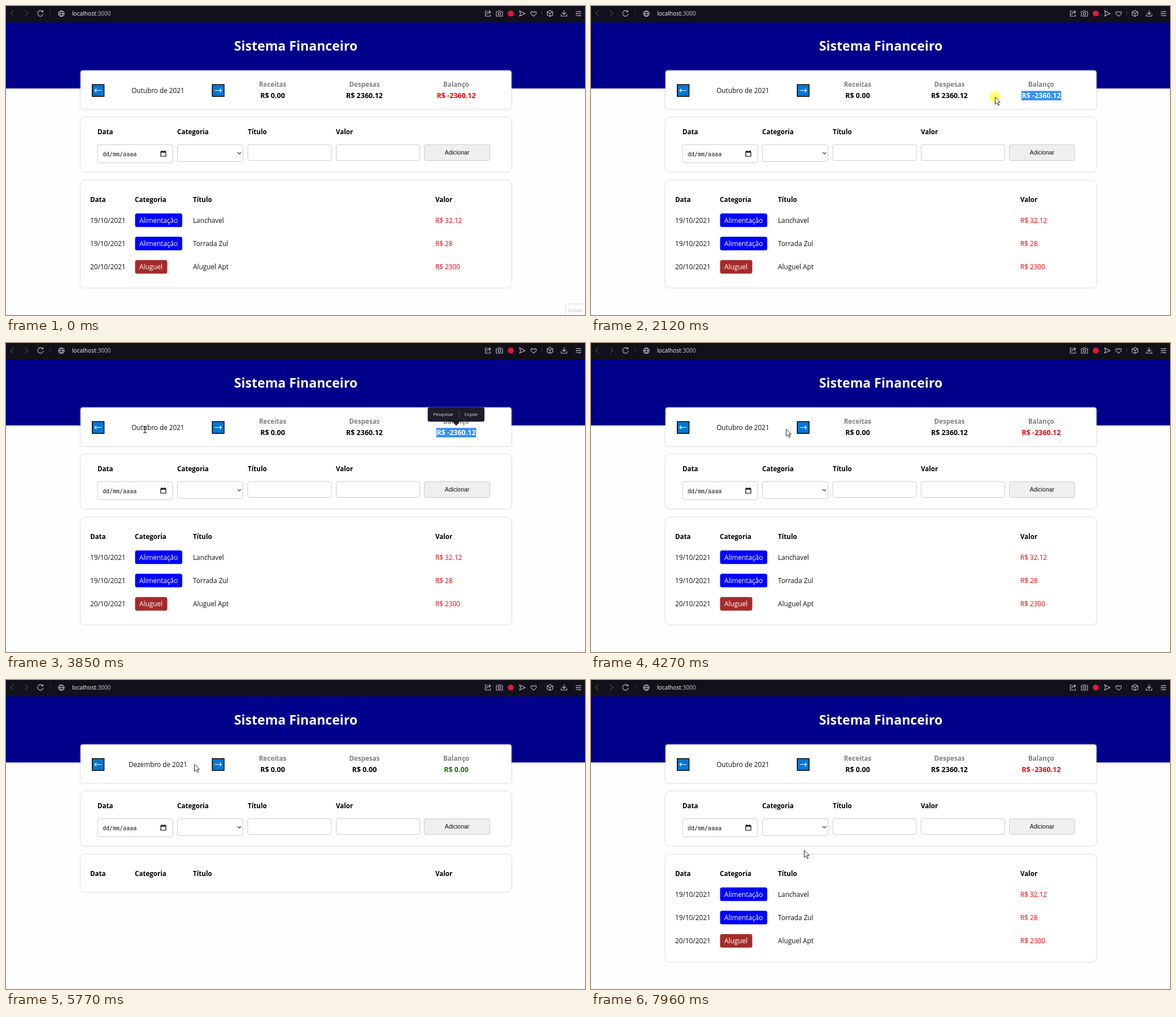
An HTML page for the animation above (8000 ms loop, 1025x547 px).

```html
<!DOCTYPE html>
<html lang="pt-BR">
<head>
<meta charset="utf-8">
<title>Sistema Financeiro</title>
<style>
  html, body { margin: 0; width: 100%; height: 100%; overflow: hidden; background: #fefefe; }
  svg { display: block; width: 100vw; height: 100vh; }
  text { font: 11.8px "Open Sans", "Noto Sans", sans-serif; fill: #111; white-space: pre; }
  .bold { font-weight: 700; font-size: 11.6px; fill: #000; }
  .gray { fill: #808080; }
  .sum { font-weight: 700; font-size: 12.5px; fill: #000; }
  .mid { text-anchor: middle; }
  .title { font-weight: 700; font-size: 23.1px; fill: #fff; }
  .url { font-size: 10.2px; fill: #fff; }
  .mono { font: 10px "DejaVu Sans Mono", monospace; }
  .button { font: 10.4px "Liberation Sans", sans-serif; }
  .popup { font-size: 7.9px; fill: #e4e3e8; }
  .white { fill: #fff; }
  .red { fill: #f00; }
  .green { fill: #008000; }
  .card { fill: #fff; filter: url(#shadow); }
  .field { fill: #fff; stroke: #ccc; }
  .icons { fill: none; stroke: #bdbbc8; stroke-width: 1.1; stroke-linejoin: round; stroke-linecap: round; }
  .dim { stroke: #4a4756; }
</style>
</head>
<body>
<svg id="stage" viewBox="0 0 1025 547">
  <defs>
    <filter id="shadow" x="-5%" y="-20%" width="110%" height="140%">
      <feDropShadow dx="0" dy="0" stdDeviation="1.8" flood-color="#bbb"/>
    </filter>
  </defs>
</svg>
<script>
const LOOP = 8000;
const stage = document.getElementById('stage');

const text = (x, y, content, cls = '') => `<text x="${x}" y="${y}" class="${cls}">${content}</text>`;
const rect = (x, y, w, h, attrs = '') => `<rect x="${x}" y="${y}" width="${w}" height="${h}" ${attrs}/>`;
const path = (d, attrs = '') => `<path d="${d}" ${attrs}/>`;
const circle = (x, y, r, attrs = '') => `<circle cx="${x}" cy="${y}" r="${r}" ${attrs}/>`;
const group = (content, attrs = '') => {
  const g = document.createElementNS(stage.namespaceURI, 'g');
  g.innerHTML = content;
  if (attrs) g.setAttribute('class', attrs);
  return stage.appendChild(g);
};

// Browser bar
group(rect(0, 0, 1025, 146, 'fill="#00008b"') + rect(0, 0, 1025, 29, 'fill="#12101a"') +
  text(117, 17, 'localhost<tspan fill="#c4c2cc">:3000</tspan>', 'url') +
  text(513, 79, 'Sistema Financeiro', 'title mid'));
group(
  path('M13 8.5L8 13L13 17.5M34 8.5L39 13L34 17.5', 'class="dim"') +
  path('M78.500 9V18M948.500 9V18', 'class="dim" stroke-dasharray="1 2"') +
  path('M65 10A5 5 0 1 0 66 14M65.500 8V10.500H63') +
  circle(98, 13.5, 5) + path('M93 13.500H103M98 8.500C94.500 11 94.500 16 98 18.500C101.500 16 101.500 11 98 8.500') +
  path('M852 9H848.500V18H857.500V15M851 15C851 12 853 10.500 857.500 10.500M855 8L858 10.500L855 13') +
  path('M868 10H871L872 8.500H875L876 10H879V18H868Z') + circle(873.5, 13.8, 2.2) +
  path('M909 8.500L919 13.500L909 18L911 13.500Z') +
  path('M934 18C926 13 929 8 934 11C939 8 942 13 934 18Z') +
  path('M963 8L968 10.500V16L963 18.500L958 16V10.500ZM958 10.500L963 13L968 10.500M963 13V18') +
  path('M988 8V15M985 12L988 15L991 12M983 15V18H993V15') +
  path('M1009 10H1018M1009 13.500H1018M1009 17H1018M1015 9V11M1011 12.500V14.500M1015 16V18'), 'icons');
group(circle(893.5, 13.3, 5.3, 'fill="#e5173f"'));

// Summary and form cards
const monthButton = (x, head) =>
  rect(x + .7, 139.2, 20.8, 20.8, 'fill="#0078d7" stroke="#000" stroke-width="1.5"') +
  path(`M${x + 5} 149.500H${x + 17}${head}`, 'fill="none" stroke="#fff" stroke-width="1.1"');
group(
  rect(132, 114.3, 762.6, 68, 'rx="4" class="card"') +
  rect(132, 197.3, 762.6, 96, 'rx="8" class="card"') +
  monthButton(152, 'M160 146.500L157 149.500L160 152.500') +
  monthButton(364.500, 'M378.500 146.500L381.500 149.500L378.500 152.500') +
  text(472, 143, 'Receitas', 'bold gray mid') +
  text(634.5, 143, 'Despesas', 'bold gray mid') +
  text(797, 143, 'Balanço', 'bold gray mid') +
  [[162, 'Data'], [303, 'Categoria'], [428, 'Título'], [584, 'Valor']]
    .map(([x, label]) => text(x, 226.5, label, 'bold')).join('') +
  [[162, 133, 32], [303.5, 116, 30], [428, 148, 28], [584.5, 148, 28]]
    .map(([x, w, h]) => rect(x, 245.5, w, h, 'rx="3.5" class="field"')).join('') +
  text(171, 265.5, 'dd/mm/aaaa', 'mono') +
  path('M274 258H283V266H274Z', 'fill="none" stroke="#000" stroke-width="1.2"') +
  path('M274 258.500H283M276 256V258M281 256V258', 'stroke="#000" stroke-width="2"') +
  path('M410 259L413 262L416 259', 'fill="none" stroke="#333" stroke-width="1.2"') +
  rect(740.5, 245.5, 116, 28, 'rx="3.5" fill="#efefef" stroke="#ccc"') +
  text(798.5, 263, 'Adicionar', 'button mid'));

// Months
const badges = {
  'Alimentação': ['#00f', 83.5], 'Aluguel': ['#a52a2a', 57], 'Salário': ['#008000', 52.5]
};
const row = ([date, category, title, value], i) => {
  const y = 384 + i * 41.2;
  const [color, width] = badges[category];
  return text(149, y, date) + rect(228.5, y - 16.7, width, 24, `rx="3.5" fill="${color}"`) +
    text(236, y, category, 'white') + text(331, y, title) +
    text(760, y, `R$ ${value}`, category === 'Salário' ? 'green' : 'red');
};
const month = (name, income, expense, balance, rows) => group(
  text(269, 153.5, `${name} de 2021`, 'mid') +
  text(472, 163.3, `R$ ${income}`, 'sum mid') +
  text(634.5, 163.3, `R$ ${expense}`, 'sum mid') +
  text(797, 163.3, `R$ ${balance}`, `sum mid ${balance[0] === '-' ? 'red' : 'green'}`) +
  rect(132, 309, 762.6, 66 + rows.length * 41.2, 'rx="8" class="card"') +
  [[149, 'Data'], [228, 'Categoria'], [331, 'Título'], [760, 'Valor']]
    .map(([x, label]) => text(x, 347, label, 'bold')).join('') +
  rows.map(row).join(''));
const months = [
  month('Outubro', '0.00', '2360.12', '-2360.12', [
    ['19/10/2021', 'Alimentação', 'Lanchavel', '32.12'],
    ['19/10/2021', 'Alimentação', 'Torrada Zul', '28'],
    ['20/10/2021', 'Aluguel', 'Aluguel Apt', '2300']]),
  month('Novembro', '4500.00', '0.00', '4500.00', [
    ['18/11/2021', 'Salário', 'Sálario VUNQ', '4500']]),
  month('Dezembro', '0.00', '0.00', '0.00', [])
];

// Overlays
const selection = group(rect(762, 150.3, 70.3, 16.7, 'fill="#3390ff"') +
  text(797, 163.3, 'R$ -2360.12', 'sum mid white'));
const popup = group(
  rect(746.5, 113.7, 100.5, 25.5, 'rx="3.5" fill="#1f1c2b"') +
  path('M790.500 139H803.500L797 146.500Z', 'fill="#1f1c2b"') +
  path('M802.500 120V133', 'stroke="#45425a"') +
  text(756, 129, 'Pesquisar', 'popup') + text(811.5, 129, 'Copiar', 'popup'));
const recordTip = group(rect(990.5, 527.5, 40, 25, 'fill="#fff" stroke="#ddd"') +
  `<text x="995" y="542" style="font-size:8.3px;fill:#bbb">Gravar</text>`);

const press = group(circle(0, 0, 9.3, 'fill="#ff0" fill-opacity=".6"'));
const cursors = {
  arrow: group(path('M.5 .5V13L3.500 10.300L5.700 15L7.600 14.100L5.500 9.500H9.300Z',
    'fill="#fff" stroke="#111" stroke-width=".9"')),
  beam: group(path('M-3 -5.500H-1L0 -4.500L1 -5.500H3M0 -4.500V5M-3 6H-1L0 5L1 6H3',
    'fill="none" stroke="#111" stroke-width="1.1"')),
  hand: group(path('M-1 1C-1 -.800 1.500 -.800 1.500 1V6C2 4.800 4 5 4 6.300C4.800 5.400 6.500 5.800 6.500 7C7.500 6.300 9 7 9 8.300V12L7.500 15V17H0V15L-4 10C-5 8.500 -3.300 7.500 -2.300 8.700L-1 10Z',
    'fill="#fff" stroke="#111" stroke-width="1"'))
};

// Pointer path: time, x, y
const route = [
  [70, 1000, 538], [290, 660, 440], [500, 272, 335], [570, 278, 300], [820, 600, 216],
  [1030, 745, 190], [1380, 815, 176], [1670, 834, 163], [1790, 834, 163], [2200, 660, 160],
  [2510, 583, 163], [2790, 486, 167], [3080, 350, 160], [3360, 236, 154], [3570, 219, 152],
  [3850, 246, 153], [4060, 312, 153], [4270, 345, 152], [4620, 373, 150], [4890, 377, 150],
  [5570, 377, 150], [5880, 280, 147], [6190, 173, 150], [6990, 173, 150], [7200, 268, 400],
  [7340, 275, 451], [7480, 345, 508], [7620, 432, 470], [7740, 412, 400], [7890, 367, 332],
  [7960, 377, 301], [8000, 377, 301]
];
const STEP = 70;
function pointerAt(t) {
  const i = Math.max(0, route.findLastIndex(p => p[0] <= t));
  const [t0, x0, y0] = route[i];
  const [t1, x1, y1] = route[i + 1] || [t0 + 1, x0, y0];
  const k = Math.floor((t - t0) / STEP) * STEP / (t1 - t0);
  return [x0 + (x1 - x0) * k, y0 + (y1 - y0) * k];
}

// Hover zones: left, top, right, bottom, cursor
const zones = [
  [152, 138, 175, 161, 'hand'], [364, 138, 387, 161, 'hand'],
  [222, 141, 316, 158, 'beam'], [602, 151, 667, 166, 'beam'], [762, 151, 832, 166, 'beam'],
  [236, 372, 304, 388, 'beam'], [236, 413, 304, 429, 'beam'], [236, 454, 278, 470, 'beam']
];
const cursorOver = (x, y) =>
  (zones.find(([l, t, r, b]) => x >= l && x <= r && y >= t && y <= b) || [])[4] || 'arrow';

const presses = [[1720, 2930], [4060, 4130], [4820, 4890], [5240, 5310], [6260, 6330], [6530, 6660]];
const monthChanges = [[0, 0], [4890, 1], [5310, 2], [6330, 1], [6660, 0]];

const show = (el, on) => { el.style.display = on ? '' : 'none'; };
const within = (t, from, to) => t >= from && t < to;

function draw(now) {
  const t = now % LOOP;
  const current = monthChanges.findLast(c => c[0] <= t)[1];
  months.forEach((m, i) => show(m, i === current));
  show(selection, within(t, 1860, 4130));
  show(popup, within(t, 2930, 4130));
  show(recordTip, t < 70);

  const [x, y] = pointerAt(t);
  const kind = cursorOver(x, y);
  const place = `translate(${x} ${y})`;
  for (const name in cursors) {
    show(cursors[name], t >= 70 && name === kind);
    cursors[name].setAttribute('transform', place);
  }
  show(press, presses.some(([from, to]) => within(t, from, to)));
  press.setAttribute('transform', place);
}

const start = performance.now();
(function tick() {
  draw(performance.now() - start);
  requestAnimationFrame(tick);
})();
</script>
</body>
</html>
```
